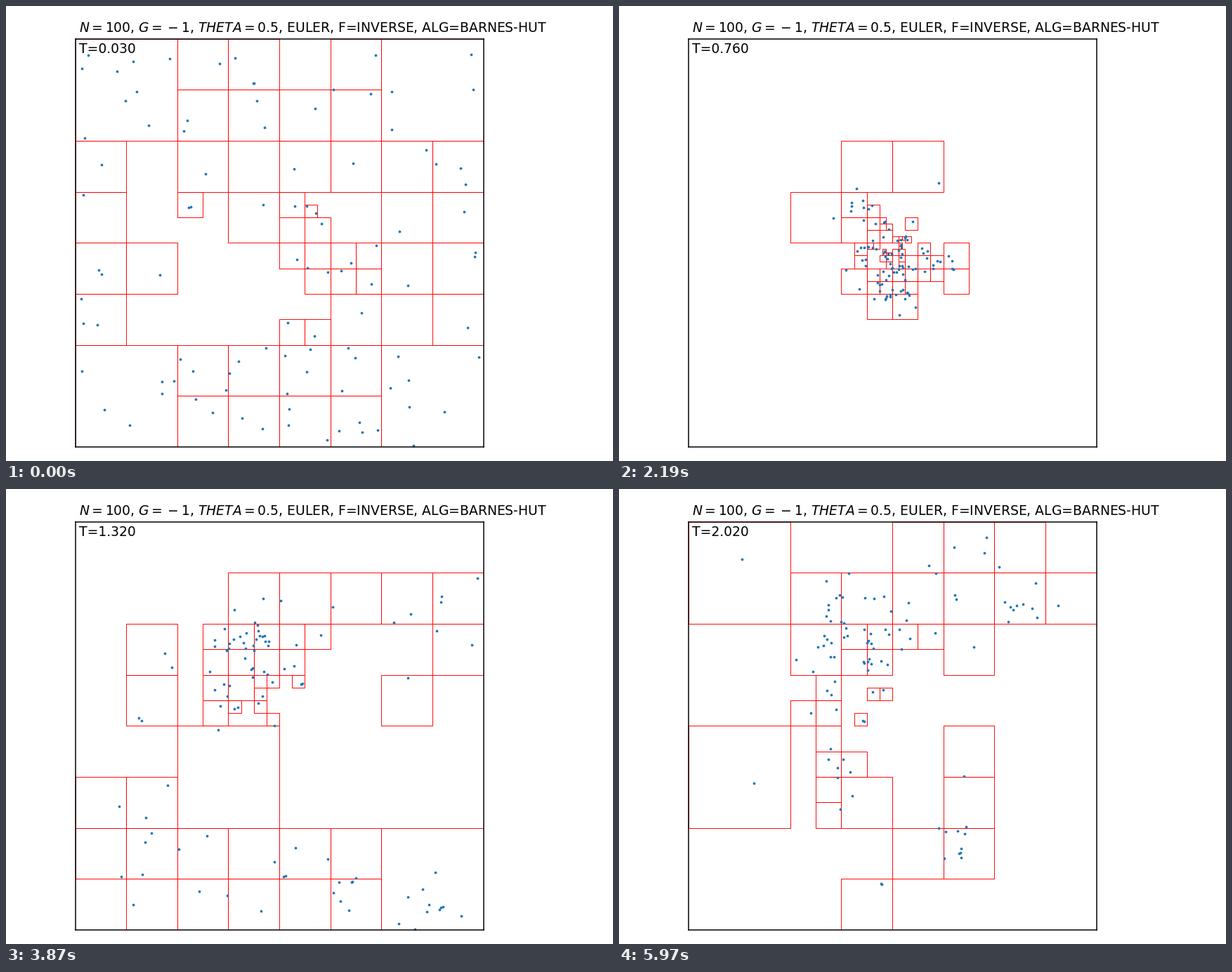
Animation of 864 by 648 pixels, one loop 6000 ms. Source, as a matplotlib script:

```python
import numpy as np
import matplotlib.pyplot as plt
from matplotlib.animation import FuncAnimation
from matplotlib.collections import PolyCollection

W, H, DPI = 864, 648, 135
N, G, THETA = 100, -1, 0.5
DT, EPS = 0.01, 0.005
MASS = 1 / N
FRAMES, WARMUP = 200, 3
MAX_DEPTH = 16


class Cell:
    """Quadtree cell holding its bodies' total mass and centre of mass."""

    def __init__(self, x, y, size, bodies, depth=0):
        self.x, self.y, self.size = x, y, size
        n = len(bodies)
        self.mass = n * MASS
        self.cx = sum(b[0] for b in bodies) / n
        self.cy = sum(b[1] for b in bodies) / n
        self.kids = []
        if n > 1 and depth < MAX_DEPTH:
            half = size / 2
            mx, my = x + half, y + half
            parts = {}
            for b in bodies:
                parts.setdefault((b[0] >= mx, b[1] >= my), []).append(b)
            self.kids = [Cell(x + half * i, y + half * j, half, part, depth + 1)
                         for (i, j), part in parts.items()]


def visible_cells(root, px, py):
    """Cells that stand in for all bodies when seen from (px, py)."""
    stack, found = [root], []
    while stack:
        c = stack.pop()
        dx, dy = c.cx - px, c.cy - py
        if not c.kids or c.size * c.size < THETA ** 2 * (dx * dx + dy * dy):
            found.append((c, dx, dy))
        else:
            stack.extend(c.kids)
    return found


def acceleration(root, px, py):
    ax = ay = 0.0
    for c, dx, dy in visible_cells(root, px, py):
        f = -G * c.mass / (dx * dx + dy * dy + EPS * EPS)
        ax += f * dx
        ay += f * dy
    return ax, ay


def step(pos, vel):
    """Semi-implicit Euler step with elastic walls."""
    root = Cell(0, 0, 1, pos.tolist())
    acc = np.array([acceleration(root, x, y) for x, y in pos.tolist()])
    vel = vel + acc * DT
    pos = pos + vel * DT
    out = (pos < 0) | (pos > 1)
    vel = np.where(out, -vel, vel)
    pos = np.where(pos < 0, -pos, np.where(pos > 1, 2 - pos, pos))
    return np.clip(pos, 0, 1), vel


def simulate():
    rng = np.random.RandomState(0)
    start = rng.rand(N, 4)
    vel, pos = 0.2 * (start[:, :2] - 0.5), start[:, 2:]
    states = []
    for k in range(1, WARMUP + FRAMES):
        pos, vel = step(pos, vel)
        if k >= WARMUP:
            states.append(pos)
    return states


def square(c):
    x0, y0, x1, y1 = c.x, c.y, c.x + c.size, c.y + c.size
    return [(x0, y0), (x1, y0), (x1, y1), (x0, y1)]


states = simulate()

fig = plt.figure(figsize=(W / DPI, H / DPI), dpi=DPI, facecolor="white")
side = 581
ax = fig.add_axes([98.5 / W, 20.25 / H, side / W, side / H])
ax.set(xlim=(0, 1), ylim=(0, 1), xticks=[], yticks=[])

ax.text(0.01, 1.01,
        "$N=100$, $G=-1$, $THETA=0.5$, EULER, F=INVERSE, ALG=BARNES-HUT",
        va="bottom", transform=ax.transAxes)
clock = ax.text(0.01, 0.9915, "", va="top", transform=ax.transAxes)
grid = PolyCollection([], facecolors="none", edgecolors="red", linewidths=0.5)
ax.add_collection(grid, autolim=False)
dots, = ax.plot([], [], "o", color="C0", ms=1)


def draw(k):
    pos = states[k]
    root = Cell(0, 0, 1, pos.tolist())
    grid.set_verts([square(c) for c, _, _ in visible_cells(root, 0.5, 0.5)])
    dots.set_data(pos[:, 0], pos[:, 1])
    clock.set_text(f"T={(k + WARMUP) * DT:.3f}")
    return grid, dots, clock


anim = FuncAnimation(fig, draw, frames=FRAMES, interval=30, repeat=True,
                     repeat_delay=0)
plt.show()
```
